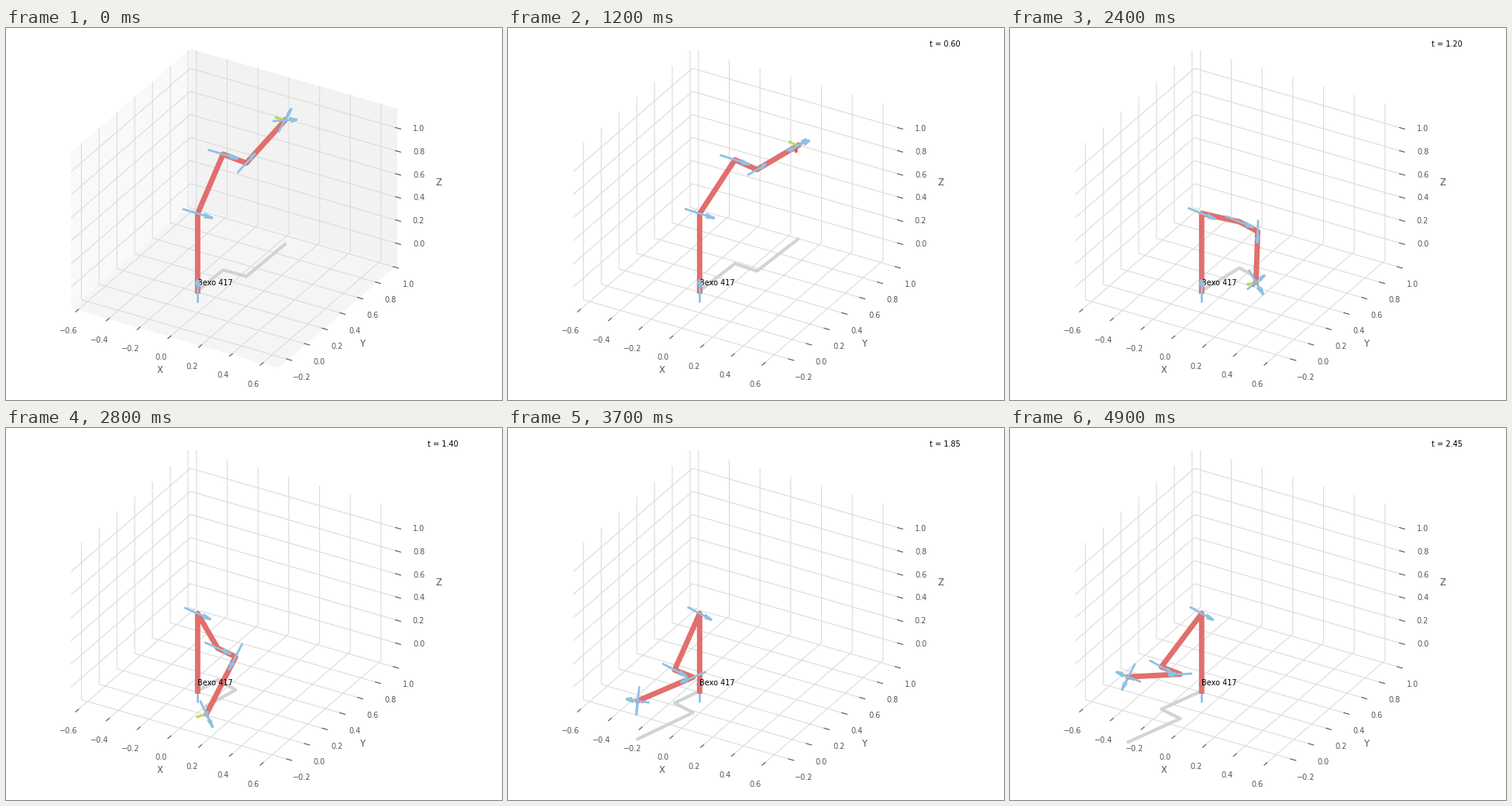
A matplotlib script for the animation above (5000 ms loop, 640 by 480 pixels).

```python
import numpy as np
import matplotlib.pyplot as plt
from matplotlib.animation import FuncAnimation
from matplotlib.collections import LineCollection

plt.rcParams["font.family"] = "DejaVu Sans"

W, H, DPI = 640, 480, 100
FRAMES, INTERVAL, DT = 50, 100, 0.05
SCALE, ORIGIN = 229.2, np.array([247.3, 339.4])
LOW = np.array([-0.64, -0.313, -0.188])
HIGH = np.array([0.705, 1.026, 1.168])
GREY = "#555555"
ROBOT_NAME = "Bexo 417"

# Orthographic view: elevation 30, azimuth -60, z squeezed to 3/4.
C30 = np.sqrt(3) / 2
VIEW = SCALE * np.array([[C30, 0.5, 0], [0.25, -C30 / 2, -0.75 * C30]])
TOWARD_EYE = np.array([C30 / 2, -0.75, 0.375])

# Arm geometry as (d, a, alpha) rows and the two joint poses.
LINKS = [
    (0.6718, 0, np.pi / 2),
    (0, 0.4318, 0),
    (0.15005, 0.0203, -np.pi / 2),
    (0.4318, 0, np.pi / 2),
    (0, 0, -np.pi / 2),
    (0, 0, 0),
]
Q_START = np.radians([89, 50, -127.8, -29.5, 13, 48])
Q_END = np.radians([72, -135, -159.5, -173.4, -76.5, 105])

AXIS_COLOR, AXIS_LEN, TOOL_LEN = "#8FC1E2", 0.2, 0.06
TOOL_COLORS = ["#F84752", "#BADA55", "#54AEFF"]


def project(points):
    return np.asarray(points, float) @ VIEW.T + ORIGIN


def link_matrix(theta, d, a, alpha):
    ct, st, ca, sa = np.cos(theta), np.sin(theta), np.cos(alpha), np.sin(alpha)
    return np.array([
        [ct, -st * ca, st * sa, a * ct],
        [st, ct * ca, -ct * sa, a * st],
        [0, sa, ca, d],
        [0, 0, 0, 1],
    ])


def link_frames(q):
    frames = [np.eye(4)]
    for theta, link in zip(q, LINKS):
        frames.append(frames[-1] @ link_matrix(theta, *link))
    return frames


def arrow_segments(start, vec):
    """Shaft plus two head strokes turned 15 degrees about a level axis."""
    flat = np.hypot(vec[0], vec[1])
    axis = np.array([vec[1], -vec[0], 0]) / flat if flat > 1e-9 else np.array([0, 1, 0])
    tip = start + vec
    along = vec * np.cos(np.radians(15))
    aside = np.cross(axis, vec) * np.sin(np.radians(15))
    heads = [tip - 0.3 * (along + k * aside) for k in (1, -1)]
    return np.array([[start, tip], [tip, heads[0]], [tip, heads[1]]])


fig = plt.figure(figsize=(W / DPI, H / DPI), dpi=DPI, facecolor="white")
ax = fig.add_axes([0, 0, 1, 1])
ax.set_xlim(0, W)
ax.set_ylim(H, 0)
ax.axis("off")


def stroke(points, color, width=0.8, zorder=1.0):
    x, y = project(points).T
    return ax.plot(x, y, color=color, lw=width, zorder=zorder)[0]


def label(x, y, text, size=7):
    """Text centred on its digit or capital height."""
    baseline = y + 0.365 * size * DPI / 72
    ax.text(x, baseline, text, size=size, color=GREY, ha="center", va="baseline")


def pane(corners, shade):
    return ax.fill(*project(corners).T, color=str(shade), lw=0, zorder=0)[0]


(X0, Y0, Z0), (X1, Y1, Z1) = LOW, HIGH
panes = [
    pane([(X0, Y0, Z0), (X0, Y1, Z0), (X0, Y1, Z1), (X0, Y0, Z1)], 0.975),
    pane([(X0, Y1, Z0), (X1, Y1, Z0), (X1, Y1, Z1), (X0, Y1, Z1)], 0.95),
    pane([(X0, Y0, Z0), (X1, Y0, Z0), (X1, Y1, Z0), (X0, Y1, Z0)], 0.9625),
]


def tick(point, axis, sign):
    """Short mark across the box edge, longer on the outer side."""
    out = np.zeros(3)
    out[axis] = sign * (HIGH - LOW)[axis] / 12
    stroke([point - 0.1 * out, point + 0.2 * out], GREY, zorder=1.2)


def tick_text(value):
    return f"{value:.1f}".replace("-", "\u2212")


GRID = "#dbdbdb"
for i in range(7):
    x, y = (i - 3) / 5, (i - 1) / 5
    stroke([(x, Y0, Z0), (x, Y1, Z0), (x, Y1, Z1)], GRID)
    tick(np.array([x, Y0, Z0]), 1, -1)
    label(81 + 39.75 * i, 390.5 + 11.46 * i, tick_text(x))

    stroke([(X0, y, Z1), (X0, y, Z0), (X1, y, Z0)], GRID)
    tick(np.array([X1, y, Z0]), 0, 1)
    label(381.5 + 22.95 * i, 450 - 19.9 * i, tick_text(y))
for i in range(6):
    z = i / 5
    stroke([(X0, Y0, z), (X0, Y1, z), (X1, Y1, z)], GRID)
    tick(np.array([X1, Y1, z]), 0, 1)
    label(532.5, 278.5 - 29.8 * i, tick_text(z))
for x, y, name in [(198.5, 441, "X"), (460.5, 406.5, "Y"), (558, 198.5, "Z")]:
    label(x, y, name, 8.4)

shadow = stroke([(0, 0, 0)], "lightgrey", 3, 2)
arm = stroke([(0, 0, 0)], "#E16F6D", 5, 2)
ax.text(*project((0, 0, 0.05)), ROBOT_NAME, size=7, color="black", zorder=3)
clock = ax.text(544, 24, "", size=7, color="black", zorder=3)
arrows = [
    ax.add_collection(LineCollection([], colors=c, linewidths=2), autolim=False)
    for c in TOOL_COLORS + [AXIS_COLOR] * 6
]


def update(n):
    t = n / (FRAMES - 1)
    ease = t**3 * (10 - 15 * t + 6 * t**2)
    frames = link_frames(Q_START + (Q_END - Q_START) * ease)

    joints = np.array([f[:3, 3] for f in frames])
    arm.set_data(*project(joints).T)
    shadow.set_data(*project(joints * [1, 1, 0]).T)

    tool = frames[-1]
    shapes = [arrow_segments(tool[:3, 3], TOOL_LEN * tool[:3, k]) for k in range(3)]
    for f in frames[:-1]:
        vec = AXIS_LEN * f[:3, 2]
        shapes.append(arrow_segments(f[:3, 3] - vec / 2, vec))

    # Far arrows first; only the farthest one falls behind the arm.
    nearness = [(s @ TOWARD_EYE).max() for s in shapes]
    for rank, k in enumerate(np.argsort(nearness, kind="stable")):
        arrows[k].set_segments(project(shapes[k]))
        arrows[k].set_zorder(1.5 + rank)

    for p in panes:
        p.set_visible(n == 0)
    clock.set_text(f"t = {n * DT:.2f}" if n else "")
    return [arm, shadow, clock, *arrows, *panes]


anim = FuncAnimation(fig, update, frames=FRAMES, interval=INTERVAL,
                     repeat=True, repeat_delay=0, blit=False)
plt.show()
```
